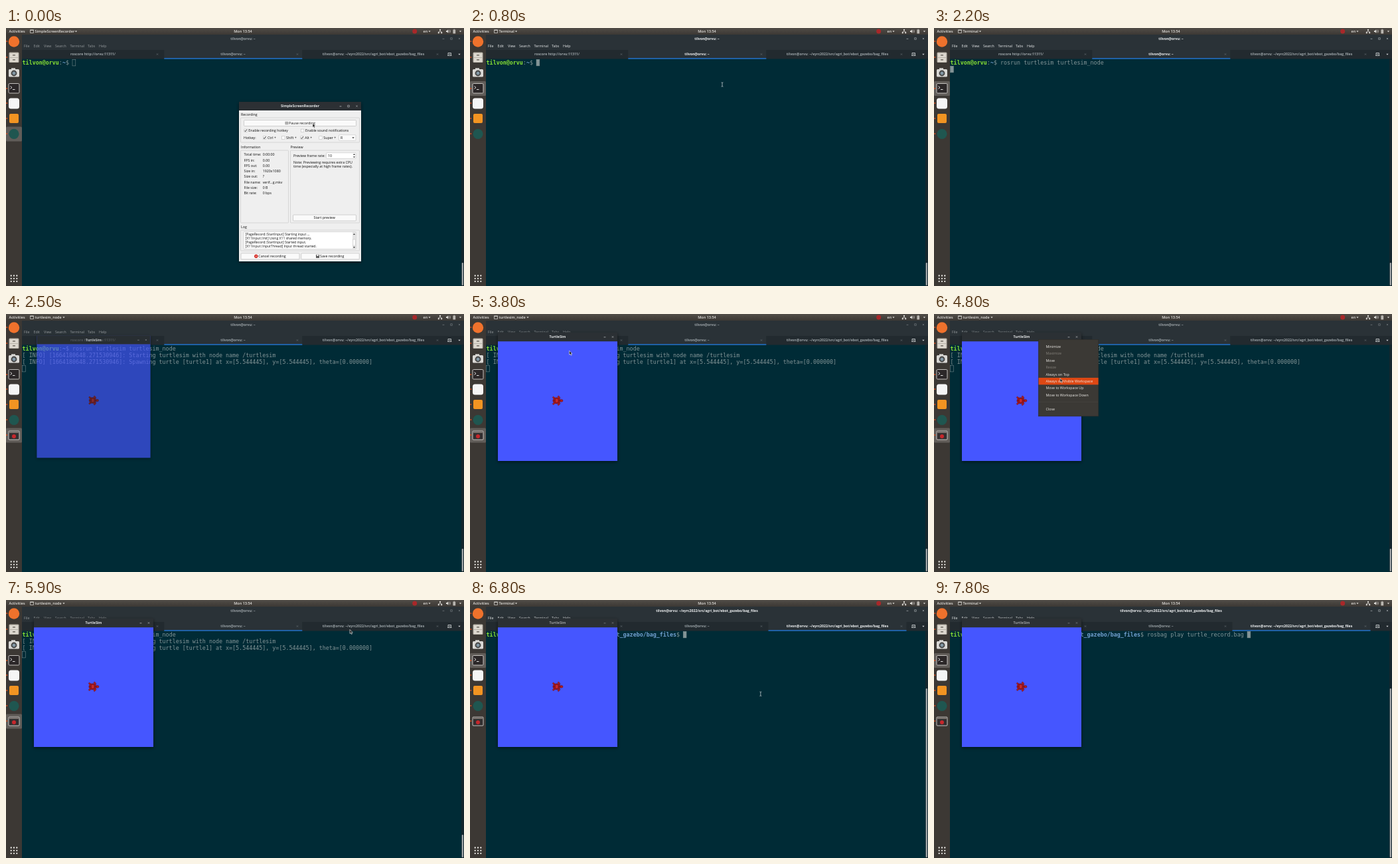
Animation, 690 px wide and 388 px high, one loop 8 s. Source, as an HTML page:

```html
<!DOCTYPE html>
<html lang="en">
<head>
<meta charset="utf-8">
<title>Turtle demo on a desktop</title>
<style>
html, body { margin: 0; width: 100%; height: 100%; overflow: hidden; background: #002b36; }
svg { display: block; width: 690px; height: 388px; }
text { font: 500 5.3px "Open Sans", "Noto Sans", sans-serif; white-space: pre; fill: #111; }
.bar text { font-size: 5.5px; font-weight: 600; fill: #e4e2de; }
.b text, text.b { font-size: 5.2px; font-weight: 700; }
.mid { text-anchor: middle; }
.light text, text.light { fill: #e6e8e9; }
#log text { font-size: 5.1px; }
#menu text { fill: #eeece8; }
#menu text.off { fill: #85827c; }
#term text { font: 8.35px "DejaVu Sans Mono", monospace; fill: #839496; }
.user { fill: #8ae234; font-weight: 700; }
.path { fill: #729fcf; font-weight: 700; }
</style>
</head>
<body>
<svg id="stage" viewBox="0 0 690 388" xmlns="http://www.w3.org/2000/svg"></svg>
<script>
const LOOP = 8000, STEP = 100;
const COL = 5.027, LEFT = 24.6, ROW = 10;
const USER = 'tilvon@orvu', DIR = '~/eyrc2022/src/agri_bot/ebot_gazebo/bag_files';
const stage = document.getElementById('stage');
const $ = id => document.getElementById(id);

// Markup helpers; text is placed by its vertical middle.
const text = (x, y, s, cls = '', extra = '') =>
  `<text x="${x}" y="${y + 1.9}" class="${cls}" ${extra}>${s}</text>`;
const rect = (x, y, w, h, fill, extra = '') =>
  `<rect x="${x}" y="${y}" width="${w}" height="${h}" fill="${fill}" ${extra}/>`;
const disc = (x, y, r, fill, extra = '') =>
  `<circle cx="${x}" cy="${y}" r="${r}" fill="${fill}" ${extra}/>`;
const path = (d, stroke, w = .7, fill = 'none') =>
  `<path d="${d}" stroke="${stroke}" stroke-width="${w}" fill="${fill}"/>`;
const group = (id, body, extra = '') => `<g id="${id}" ${extra}>${body}</g>`;
const cross = (x, y, c) => path(`M${x - 1.1} ${y - 1.1}l2.2 2.2m0-2.2l-2.2 2.2`, c, .6);
const dash = (x, y, c) => path(`M${x - 1.4} ${y + .3}h2.8`, c, .7);
const square = (x, y, c) => path(`M${x - 1.3} ${y - 1.3}h2.6v2.6h-2.6z`, c, .6);
const arrowDown = (x, y, c) => `<path d="M${x - 1.6} ${y - .8}h3.2l-1.6 2z" fill="${c}"/>`;

function topBar() {
  const c = '#dddbd7';
  return rect(0, 0, 690, 10, 'url(#panel)') + `<g class="bar">` +
    text(4.5, 5, 'Activities') + text(357, 5, 'Mon 13:54', 'mid') +
    path('M36.5 2.8h5v4.6h-5zM36.5 3.5h5', c, .7) +
    text(43.5, 5, '', '', 'id="app"') + group('appArrow', arrowDown(0, 5, c)) +
    disc(615.7, 5, 3.5, '#a8282a') + text(628.5, 5, 'en') + arrowDown(638, 5, c) +
    path('M654 3.5v2m-2.3 2v-2h4.6v2', c, .6) + rect(653, 1.9, 2, 2, c) +
    rect(650.8, 6.2, 2, 2, c) + rect(655.2, 6.2, 2, 2, c) +
    `<path d="M663 4h1.3l2-1.8v5.6l-2-1.8H663z" fill="${c}"/>` +
    path('M667.3 3.6q1.2 1.4 0 2.8M668.6 2.6q2 2.4 0 4.8', c, .6) +
    rect(673.4, 2.6, 3.8, 5.8, '#b9b6b1') + rect(674.5, 1.7, 1.6, 1, '#b9b6b1') +
    arrowDown(684.5, 5, c) + '</g>';
}

function dock() {
  const dot = y => disc(1.3, y, .9, '#e95420');
  const grid = [0, 1, 2].flatMap(i => [0, 1, 2].map(j =>
    disc(7.7 + i * 4.3, 372.5 + j * 4.3, 1.15, '#eeece8'))).join('');
  return rect(0, 10, 24, 378, '#3c3834') +
    rect(0, 0, 24, 22, '#615d59', 'id="active" rx="1.5"') +
    disc(12, 20.5, 8.2, '#f0722c') +
    rect(4.5, 36.5, 15, 15.5, '#b9b4aa', 'rx="1.5"') + rect(5.8, 38, 12.4, 6, '#ddd8cf') +
    rect(5.8, 45, 12.4, 6, '#ddd8cf') + rect(10, 40, 4, 1.6, '#77726a') + rect(10, 47, 4, 1.6, '#77726a') +
    rect(4, 62, 16, 11.5, '#d9d8d5', 'rx="1.5"') + rect(8, 60.3, 6, 2.5, '#d9d8d5') +
    disc(12, 68, 4.4, '#444') + disc(12, 68, 2.5, '#8296a3') +
    rect(4, 83.5, 16, 14.5, '#2b2728', 'rx="1.5" stroke="#d5d2ce" stroke-width=".9"') +
    path('M6.5 87.5l2.5 2-2.5 2M10 92.5h3.5', '#f4f4f4', .9) +
    rect(4, 105.5, 16, 16, '#f5f5f5', 'rx="3.5"') +
    rect(5, 129, 14, 14, '#f29422', 'rx="2"') +
    disc(12, 159.3, 7.6, '#1f5650') +
    group('simIcon', rect(4, 176, 16, 13, '#322f30', 'stroke="#d5d2ce" stroke-width=".9" rx="1"') +
      rect(5, 177, 14, 2, '#77716c') + disc(12, 184, 3, '#c6272c') + dot(182)) +
    [20, 44, 91, 113, 136, 159].map(dot).join('') + grid;
}

function terminal() {
  const c = '#b4b9bc';
  const tabX = [131, 342, 553.5];
  const titles = ['roscore http://orvu:11311/', USER + ': ~', `${USER}: ${DIR}`];
  const names = ['File', 'Edit', 'View', 'Search', 'Terminal', 'Tabs', 'Help'];
  const menuX = [27, 41.5, 57, 74, 96.5, 123, 140];
  const tabs = titles.map((s, i) => text(tabX[i], 39.5, s, 'b mid', `id="tab${i}"`)).join('');
  return rect(24, 10, 666, 378, '#002b36') + rect(24, 10, 666, 23, '#2a3237') +
    rect(24, 33, 666, 13.5, '#222a2f') +
    group('tabMark', rect(0, 33, 208, 13.5, '#2a3237') + rect(0, 45, 208, 1.8, '#1f66b2')) +
    text(357, 16, '', 'b mid', 'id="title"') +
    group('menuBar', names.map((s, i) => text(menuX[i], 27.5, s)).join(''), 'class="light"') +
    group('frameButtons', dash(659, 16, c) + square(671, 16, c) + cross(683, 16, c)) +
    tabs + [228, 439, 650].map(x => cross(x, 39.5, '#6c757a')).join('') +
    path('M666 41.5v-4h4.5v4M665.2 41.5h6.2M667 39.5h2.5', '#d5d8da', .8) + arrowDown(683, 39.5, '#d5d8da') +
    rect(686, 46.5, 4, 341.5, '#14262d') + rect(686.7, 0, 2.3, 1, '#a0a6a8', 'id="thumb" rx="1"') +
    group('term', shellText() + rect(0, 0, 4.8, 9.6, '#839496', 'id="caret" stroke="#839496" stroke-width=".5"'));
}

function shellText() {
  const line = (row, s, id = '') =>
    `<text x="${LEFT}" y="${55.1 + row * ROW}" id="${id}">${s}</text>`;
  const prompt = dir => `<tspan class="user">${USER}</tspan>:<tspan class="path">${dir}</tspan>$ `;
  const info = s => `[ INFO] [1664180648.271530946]: ${s}`;
  return group('shellA', line(0, prompt('~') + '<tspan id="runCmd">rosrun turtlesim turtlesim_node</tspan>') +
      group('info', line(1, info('Starting turtlesim with node name /turtlesim')) +
        line(2, info('Spawning turtle [turtle1] at x=[5.544445], y=[5.544445], theta=[0.000000]')))) +
    group('shellB', line(0, prompt(DIR) + '<tspan id="bagCmd">rosbag play turtle_record.bag</tspan>'));
}

function recorder() {
  const c = '#c8cbcd';
  const box = (x, y, w, h, fill = 'none') => rect(x, y, w, h, fill, 'stroke="#c4c4c4" stroke-width=".6" rx=".8"');
  const button = (x, y, w, s, tx) =>
    rect(x, y, w, 9, '#fafafa', 'stroke="#b5b5b5" stroke-width=".6" rx="1"') + text(tx, y + 4.5, s);
  const check = (x, y, on, s) => rect(x - 2.2, y - 2.2, 4.4, 4.4, '#fff', 'stroke="#b0b0b0" stroke-width=".5"') +
    (on ? path(`M${x - 1.5} ${y}l1.1 1.4 2-3`, '#222', .9) : '') + text(x + 4.3, y, s);
  const facts = [['Total time:', '0:00:00'], ['FPS in:', '0.00'], ['FPS out:', '0.00'], ['Size in:', '1920x1080'],
    ['Size out:', '?'], ['File name:', 'verif…g.mkv'], ['File size:', '0 B'], ['Bit rate:', '0 bps']];
  const log = ['[PageRecord::StartInput] Starting input ...', '[X11Input::Init] Using X11 shared memory.',
    '[PageRecord::StartInput] Started input.', '[X11Input::InputThread] Input thread started.'];
  return rect(351, 111, 184, 240, '#efefef', 'filter="url(#shadow)"') + rect(351, 111, 184, 13, '#2c3034') +
    text(443, 117.5, 'SimpleScreenRecorder', 'b mid light') +
    dash(504, 117.5, c) + square(516, 117.5, c) + cross(528.5, 117.5, c) +
    text(354, 130.5, 'Recording') + box(353.5, 135, 179, 37) +
    button(358.5, 138.5, 169, 'Pause recording', 426) + rect(420.6, 140.8, 4.4, 4.4, '#8a8a8a') +
    path('M422 141.3v3.4M423.6 141.3v3.4', '#fff', .6) +
    check(361, 154.3, true, 'Enable recording hotkey') + check(446.7, 154.3, false, 'Enable sound notifications') +
    text(358, 165, 'Hotkey:') + check(389.7, 165, true, 'Ctrl +') + check(417.8, 165, false, 'Shift +') +
    check(446, 165, true, 'Alt +') + check(474, 165, false, 'Super +') +
    box(501.5, 160.7, 25.5, 8.6, '#fafafa') + text(504, 165, 'R') + arrowDown(523, 165, '#333') +
    text(354, 179.5, 'Information') + box(353.5, 184, 72, 109) +
    facts.map(([k, v], i) => text(358.5, 190.5 + i * 8.25, k) + text(386.7, 190.5 + i * 8.25, v)).join('') +
    text(428.5, 179.5, 'Preview') + box(428.5, 184, 104, 109) +
    text(433, 192, 'Preview frame rate:') + box(482.5, 187.7, 44.5, 8.6, '#fff') + text(485, 192, '10') +
    arrowDown(524.5, 194, '#444') + `<path d="M522.9 191h3.2l-1.6-2z" fill="#444"/>` +
    text(433, 202, 'Note: Previewing requires extra CPU') + text(433, 208.5, 'time (especially at high frame rates).') +
    button(432.5, 281, 95, 'Start preview', 463.5) +
    text(354, 299.5, 'Log') + box(353.5, 304, 179, 31) + box(358, 306.5, 169.5, 26, '#fff') +
    group('log', log.map((s, i) => text(360.5, 309.6 + i * 6, s)).join('')) +
    rect(522, 307, 5, 25, '#e4e4e4') + rect(522.4, 318, 4.2, 9, '#fafafa', 'stroke="#b5b5b5" stroke-width=".4"') +
    `<path d="M522.9 311h3.2l-1.6-2z" fill="#444"/>` + arrowDown(524.5, 329.8, '#444') +
    button(354, 338.8, 88, 'Cancel recording', 380.3) + disc(376.8, 343.3, 2.7, '#d3261e') + cross(376.8, 343.3, '#fff') +
    button(444.8, 338.8, 87.5, 'Save recording', 473) + rect(467, 340.8, 5, 5, '#555') + rect(468, 341, 3, 2, '#ddd');
}

function turtle() {
  const oval = (x, y, rx, ry, a, fill) => `<ellipse cx="${x}" cy="${y}" rx="${rx}" ry="${ry}" fill="${fill}"
    stroke="#641018" stroke-width=".5" transform="rotate(${a} ${x} ${y})"/>`;
  const skin = '#b81c20';
  return [-1, 1].map(side => oval(134, 130.3 + side * 5, 2.4, 1.3, -side * 55, skin) +
      oval(126.2, 130.3 + side * 4.4, 1.9, 1.2, -side * 35, skin)).join('') +
    oval(137.7, 130.3, 2.3, 1.9, 0, skin) + oval(130.5, 130.3, 5.6, 4.6, 0, '#a3161c') +
    path('M128.3 128.1l2.4-1.2 2.4 1.2v4.2l-2.4 1.2-2.4-1.2zM125.2 130.3h3M133.2 130.3h3', '#5d101a', .6, '#c8282a') +
    disc(138.5, 129.4, .4, '#222');
}

function simWindow() {
  const c = '#c8cbcd';
  return rect(42, 28, 180, 193, '#4556ff', 'filter="url(#shadow)"') + rect(42, 27.5, 180, 13.7, '#2b3034') +
    group('simTitle', text(132, 34.5, 'TurtleSim', 'b mid light') + dash(203, 34.5, c) + cross(215, 34.5, c)) +
    turtle();
}

const ITEM0 = 49, ITEM = 10.42;
const items = ['Minimize', '-Maximize', 'Move', '-Resize', 'Always on Top', 'Always on Visible Workspace',
  'Move to Workspace Up', 'Move to Workspace Down', '', 'Close'];
const isOff = i => !items[i] || items[i][0] === '-';

function windowMenu() {
  return rect(157.3, 38.3, 90.5, 115.5, '#3b3935', 'stroke="#2c2a27" stroke-width=".6"') +
    rect(157.6, 0, 90, ITEM, '#dd4814', 'id="pick"') + path('M158 132.3h89', '#4d4a45', .5) +
    items.map((s, i) => text(168.5, ITEM0 + i * ITEM, s.replace('-', ''), isOff(i) ? 'off' : '')).join('');
}

stage.innerHTML = `<defs><filter id="shadow" x="-10%" y="-10%" width="120%" height="120%">
  <feDropShadow dx="0" dy="1.5" stdDeviation="2.5" flood-color="#000" flood-opacity=".55"/></filter>
  <linearGradient id="panel" x2="0" y2="1"><stop stop-color="#514d48"/><stop offset="1" stop-color="#3c3834"/>
  </linearGradient></defs>` +
  terminal() + group('recorder', recorder()) + group('sim', simWindow()) +
  topBar() + dock() + group('menu', windowMenu()) +
  group('arrow', path('M0 0v6l1.4-1.2 1 2.2 1.1-.5-1-2.1h1.8z', '#fff', .6, '#111')) +
  group('beam', path('M-1.4-3.2q1.4 0 1.4.8v4.8q0 .8-1.4.8M1.4-3.2q-1.4 0-1.4.8m0 4.8q0 .8 1.4.8', '#d8dcdd', .7));

// Pointer stops: time, x, y.
const stops = [[0, 462, 143.5], [600, 380, 85], [2700, 380, 85], [3200, 437, 57], [3800, 149.7, 55.3],
  [4100, 157.5, 36.5], [4200, 157.5, 37.5], [4800, 190, 96.6], [5000, 190, 96.6], [5300, 191, 91], [5400, 191, 91],
  [5900, 518, 44.5], [6100, 518, 41], [6300, 439, 66], [7200, 437, 195], [8000, 437, 195]];

function pointerAt(t) {
  const i = stops.findIndex(s => s[0] > t);
  const [t0, x0, y0] = stops[i - 1], [t1, x1, y1] = stops[i];
  const p = (t - t0) / (t1 - t0), k = p * p * (3 - 2 * p);
  return [x0 + (x1 - x0) * k, y0 + (y1 - y0) * k];
}

const within = (x, y, l, t, r, b) => x > l && x < r && y > t && y < b;
const show = (id, on) => { $(id).style.display = on ? '' : 'none'; };
const set = (id, attrs) => { for (const k in attrs) $(id).setAttribute(k, attrs[k]); };
const label = (id, s) => { if ($(id).textContent !== s) $(id).textContent = s; };

function render(t) {
  const recOn = t < 800, simOn = t >= 2400, bag = t >= 6100;
  const termFocus = !recOn && (!simOn || bag);
  const menuOn = t >= 4200 && t < 5500;

  label('app', recOn ? 'SimpleScreenRecorder' : termFocus ? 'Terminal' : 'turtlesim_node');
  set('appArrow', { transform: `translate(${recOn ? 105.5 : termFocus ? 69.5 : 87})` });
  set('active', { y: recOn ? 148.5 : termFocus ? 80 : 171.5 });

  label('title', `${USER}: ${bag ? DIR : '~'}`);
  $('title').style.fill = termFocus ? '#f0f2f3' : '#9da4a8';
  set('menuBar', { opacity: termFocus ? 1 : .55 });
  set('frameButtons', { opacity: termFocus ? 1 : .6 });
  set('tabMark', { transform: `translate(${bag ? 449.5 : 238.3})` });
  [0, 1, 2].forEach(i => {
    const current = i === (bag ? 2 : 1);
    $('tab' + i).style.fill = current && termFocus ? '#f0f2f3' : '#9ba3a7';
  });
  set('thumb', { y: bag ? 133 : 353, height: bag ? 254 : 34 });

  show('shellA', !bag);
  show('shellB', bag);
  show('runCmd', t >= 1500);
  show('bagCmd', t >= 7800);
  show('info', simOn);
  const [col, row] = t < 1500 ? [15, 0] : t < 2100 ? [47, 0] : t < 2400 ? [0, 1] :
    !bag ? [0, 3] : t < 7800 ? [59, 0] : [89, 0];
  set('caret', { x: LEFT + col * COL, y: 47.3 + row * ROW, 'fill-opacity': termFocus ? 1 : 0 });

  show('recorder', recOn);
  show('sim', simOn);
  show('simIcon', simOn);
  const grow = Math.min(1, (t - 2300) / 300);
  set('sim', { opacity: grow, transform: `translate(132 124) scale(${.85 + .15 * grow}) translate(-132 -124)` });
  set('simTitle', { opacity: termFocus ? .6 : 1 });

  const [x, y] = pointerAt(t);
  const visible = !(t >= 1500 && t < 2700) && t < 7300;
  const overText = y > 47 && !(recOn && within(x, y, 351, 111, 535, 351)) &&
    !(simOn && within(x, y, 42, 28, 222, 221));
  show('arrow', visible && !overText);
  show('beam', visible && overText);
  for (const id of ['arrow', 'beam']) set(id, { transform: `translate(${x} ${y})` });

  const hot = Math.round((y - ITEM0) / ITEM);
  show('menu', menuOn);
  show('pick', hot >= 0 && !isOff(hot));
  set('pick', { y: ITEM0 + (hot - .5) * ITEM });
}

const start = performance.now();
function tick() {
  const t = (performance.now() - start) % LOOP;
  render(Math.floor(t / STEP) * STEP);
  requestAnimationFrame(tick);
}
tick();
</script>
</body>
</html>
```
